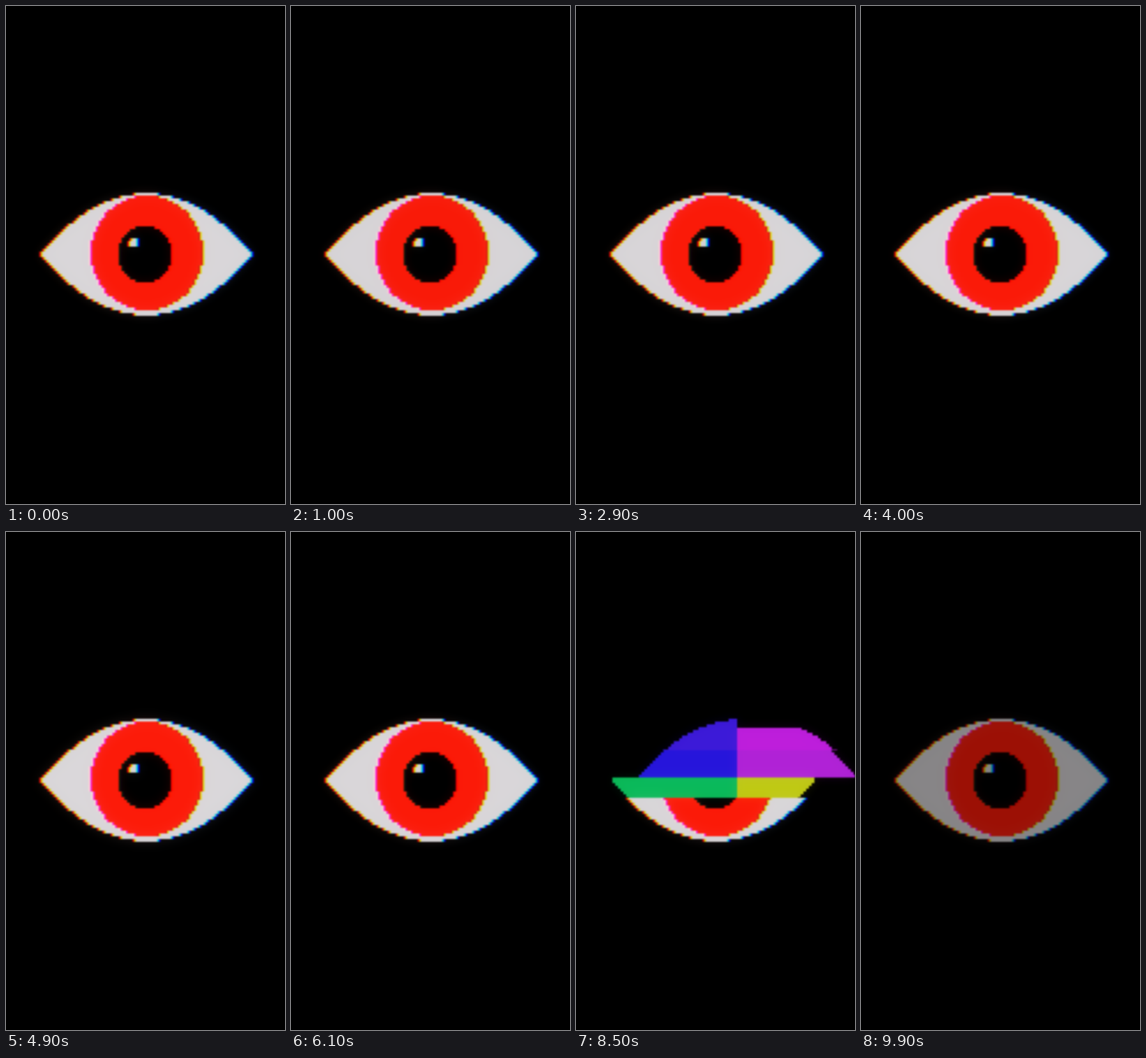
These frames come from a looping animation (400x712 px, 10000 ms). An HTML page with a canvas:

```html
<!DOCTYPE html>
<html lang="en">
<head>
<meta charset="utf-8">
<title>Glitching eye</title>
<style>
html, body { margin: 0; width: 100%; height: 100%; overflow: hidden; background: #000; }
canvas { display: block; width: 400px; height: 712px; }
</style>
</head>
<body>
<canvas id="stage" width="400" height="712"></canvas>
<script>
const W = 400, H = 712, LOOP = 10000, STEP = 100;
const CELL_W = 3.93, CELL_H = 4;
const TOP = 267, ROWS = 44, MID_X = 201.5, MID_Y = 355;

const WHITE = [213, 210, 213], RED = [252, 24, 8], BLACK = [0, 0, 0];

// Each channel is displaced sideways for the colour fringes.
const CHANNEL_SHIFT = [-2.5, 0, 2.5];

const BLUE = '#2414d8', VIOLET = '#3818d4', MAGENTA = '#b81cd8', PURPLE = '#aa20d2';
const GREEN = '#0ab454', YELLOW = '#bac412';

// Block: left, top, right, bottom, sideways shift, colour (none: keep the picture)
const GLITCHES = [
  { from: 8400, to: 8700, blocks: [
    [0, 255, W, 380, 0, '#000'],
    [0, 260, 231, 312, 35, VIOLET],
    [0, 312, 231, 351, 36, BLUE],
    [231, 280, W, 312, 61, MAGENTA],
    [231, 312, W, 351, 53, PURPLE],
    [0, 351, 231, 380, 2, GREEN],
    [231, 351, W, 380, -11, YELLOW]
  ] },
  { from: 8900, to: 9000, blocks: [
    [0, 315, W, 351, -38],
    [0, 351, W, 380, 22]
  ] }
];

function layer() {
  const canvas = document.createElement('canvas');
  canvas.width = W;
  canvas.height = H;
  return canvas.getContext('2d');
}

// Fills whole cells, row by row; halfAt gives the half width at a row's centre.
function drawRows(g, cx, halfAt) {
  for (let i = 0; i < ROWS; i++) {
    const y = TOP + i * CELL_H;
    const half = halfAt(y + CELL_H / 2);
    if (!(half > 0)) continue;
    const width = (2 * Math.floor(half / CELL_W) + 1) * CELL_W;
    g.fillRect(cx - width / 2, y, width, CELL_H);
  }
}

function drawOutline(g, dx = 0) {
  drawRows(g, MID_X + dx, y => 154 * Math.sqrt(1 - Math.abs(y - MID_Y) / 87));
}

function drawDisc(g, cy, rx, ry) {
  drawRows(g, MID_X, y => rx * Math.sqrt(1 - ((y - cy) / ry) ** 2));
}

function drawEye(g, tint) {
  g.fillStyle = tint(WHITE);
  drawOutline(g);
  g.fillStyle = tint(RED);
  drawDisc(g, 353, 81, 82);
  g.fillStyle = tint(BLACK);
  drawDisc(g, 355, 39, 41);
  g.fillStyle = tint(WHITE);
  g.fillRect(179, 332, 10, 4);
  g.fillRect(176, 336, 13, 8);
}

function makeEye() {
  const eye = layer();
  eye.fillRect(0, 0, W, H);
  eye.globalCompositeOperation = 'lighter';
  CHANNEL_SHIFT.forEach((dx, channel) => {
    const part = layer();
    drawEye(part, rgb => `rgb(${rgb.map((v, i) => i === channel ? v : 0)})`);
    eye.drawImage(part.canvas, dx, 0);
  });
  return eye.canvas;
}

function makeGlitch(blocks) {
  const g = layer();
  g.drawImage(eye, 0, 0);
  for (const [x0, y0, x1, y1, dx, color] of blocks) {
    g.save();
    g.beginPath();
    g.rect(x0, y0, x1 - x0, y1 - y0);
    g.clip();
    g.fillStyle = '#000';
    g.fillRect(0, 0, W, H);
    if (color) {
      g.fillStyle = color;
      drawOutline(g, dx);
    } else {
      g.drawImage(eye, dx, 0);
    }
    g.restore();
  }
  return g.canvas;
}

// Soft edges plus a faint screen glow.
function soften(source) {
  const g = layer();
  g.filter = 'blur(1.3px)';
  g.drawImage(source, 0, 0);
  g.globalCompositeOperation = 'screen';
  g.globalAlpha = 0.13;
  g.filter = 'blur(8px)';
  g.drawImage(source, 0, 0);
  return g.canvas;
}

const eye = makeEye();
const calm = soften(eye);
const glitches = GLITCHES.map(({ from, to, blocks }) =>
  ({ from, to, picture: soften(makeGlitch(blocks)) }));

function brightness(t) {
  if (t >= 9900) return 0.62;
  if (t >= 9800) return 0.82;
  return 0.995 + 0.005 * Math.sin(t * 0.017);
}

const stage = document.getElementById('stage').getContext('2d');

function render(t) {
  const hit = glitches.find(g => t >= g.from && t < g.to);
  stage.globalAlpha = 1;
  stage.fillStyle = '#000';
  stage.fillRect(0, 0, W, H);
  stage.globalAlpha = brightness(t);
  stage.drawImage(hit ? hit.picture : calm, 0, 0);
}

const start = performance.now();
function tick() {
  const t = (performance.now() - start) % LOOP;
  render(Math.floor(t / STEP) * STEP);
  requestAnimationFrame(tick);
}
tick();
</script>
</body>
</html>
```
